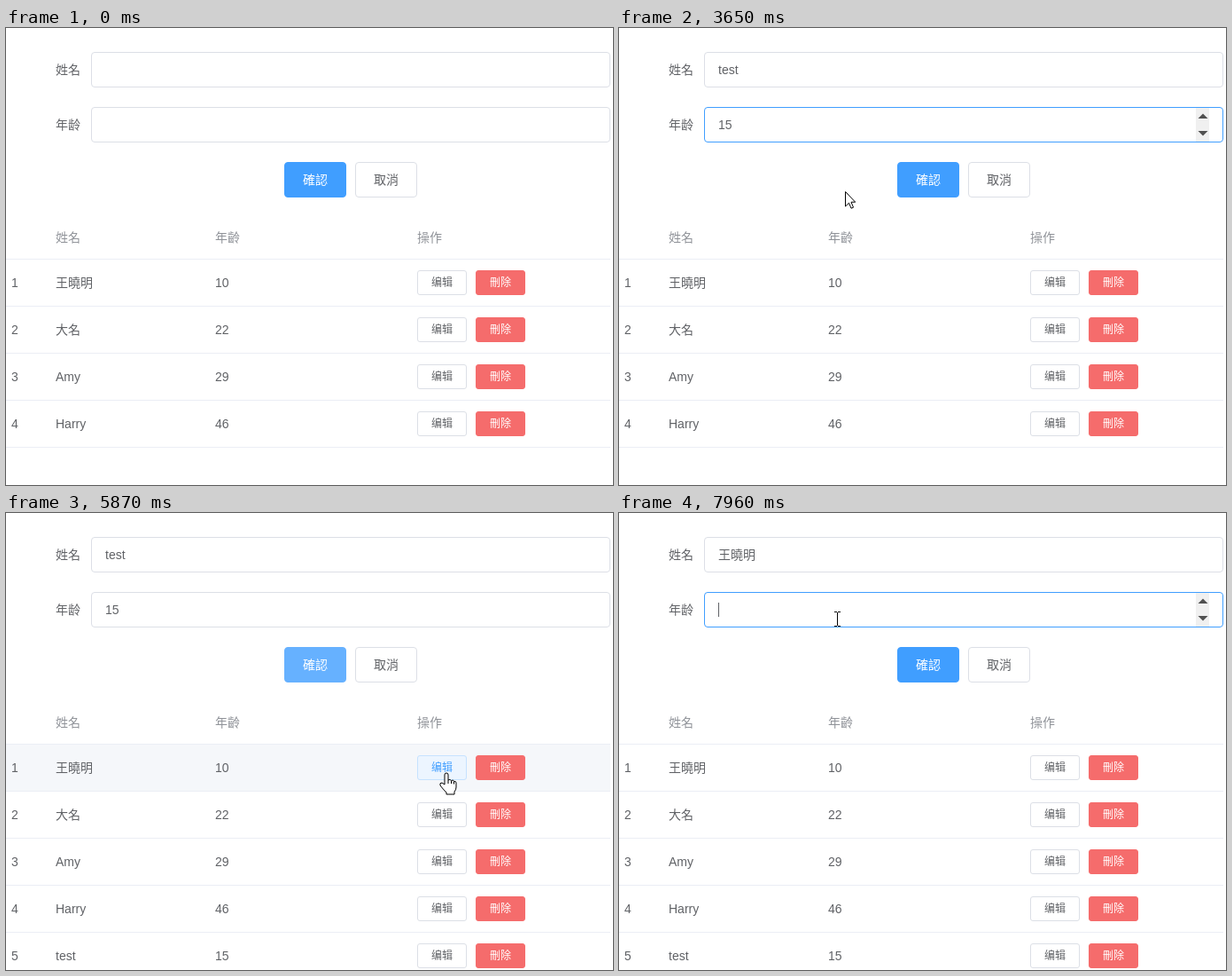
Write an HTML page with a canvas that moves like this. It is 685 by 515 pixels and loops after 8 s.

```html
<!DOCTYPE html>
<html lang="zh-Hant">
<head>
<meta charset="utf-8">
<title>Form and table</title>
<style>
html, body { margin: 0; width: 100%; height: 100%; overflow: hidden; background: #fff; }
canvas { display: block; }
</style>
</head>
<body>
<canvas id="stage" width="685" height="515"></canvas>
<script>
const ctx = document.getElementById('stage').getContext('2d');
const LOOP = 8000;
const FONT = '"Liberation Sans", "Noto Sans CJK TC", "Noto Sans CJK SC", "Noto Sans CJK JP", sans-serif';
const TEXT = '#606266', BORDER = '#dcdfe6', BLUE = '#409eff', WHITE = '#ffffff';
const people = [['王曉明', 10], ['大名', 22], ['Amy', 29], ['Harry', 46], ['test', 15]];

// Boxes are [x, y, width, height]
const nameBox = [96, 27, 586, 40], ageBox = [96, 89, 586, 40];
const confirmBox = [314, 151, 70, 40], cancelBox = [394, 151, 70, 40];
const rowTop = i => 261 + 53 * i;
const editBox = i => [464, rowTop(i) + 12, 56, 28];
const deleteBox = i => [530, rowTop(i) + 12, 56, 28];

// The pointer advances in twelve steps per move; path points are [step, x, y]
const moves = [
  { start: 130, end: 890, path: [[0, 652, 391], [7, 230, 110], [11, 176, 57]] },
  { start: 3440, end: 4200, path: [[-1, 176, 57], [1, 214, 124], [2, 233, 160], [3, 255, 184],
    [4, 265, 192], [6, 280, 198], [11, 330, 181]] },
  { start: 4800, end: 5600, path: [[-1, 330, 181], [0, 334, 195], [5, 430, 388], [7, 458, 372],
    [8, 468, 340], [11, 497, 293]] },
  { start: 6200, end: 6950, path: [[-1, 497, 293], [1, 490, 289], [3, 410, 262], [4, 351, 191],
    [9, 246, 119]] }
];

const nameField = {
  box: nameBox, focus: [[1100, 2570]],
  keys: [[0, ''], [1830, 't'], [1960, 'te'], [2180, 'tes'], [2310, 'test'], [6200, '王曉明']]
};
const ageField = {
  box: ageBox, focus: [[2570, 4270], [6900, LOOP]], spinner: true,
  keys: [[0, ''], [2910, '1'], [3040, '15'], [6200, '10'], [7760, '1'], [7900, '']]
};

const between = (t, a, b) => t >= a && t < b;
const latest = (list, t, key) => list.filter(item => key(item) <= t).pop();

function pointerAt(t) {
  const move = latest(moves, t, m => m.start);
  if (!move) return null;
  const step = Math.min(11, Math.floor((t - move.start) / (move.end - move.start) * 11));
  const next = move.path.find(p => p[0] >= step) || move.path[move.path.length - 1];
  const prev = latest(move.path, step, p => p[0]);
  const k = next[0] > prev[0] ? (step - prev[0]) / (next[0] - prev[0]) : 0;
  return [1, 2].map(i => Math.round(prev[i] + (next[i] - prev[i]) * k));
}

function hovers([x, y, w, h], t) {
  const p = pointerAt(t);
  return !!p && between(p[0], x, x + w) && between(p[1], y, y + h);
}

// Share of the last `ms` during which a state held: a linear transition
function fade(test, t, ms = 100) {
  let held = 0;
  for (let i = 0; i < 10; i++) held += test(t - ms * i / 10) ? 1 : 0;
  return held / 10;
}

function mix(from, to, k) {
  const channel = (c, i) => parseInt(c.slice(i, i + 2), 16);
  return '#' + [1, 3, 5].map(i =>
    Math.round(channel(from, i) + (channel(to, i) - channel(from, i)) * k).toString(16).padStart(2, '0')).join('');
}

function write(text, x, middle, color = TEXT, size = 14, weight = 400, align = 'left') {
  ctx.font = `${weight} ${size}px ${FONT}`;
  ctx.textAlign = align;
  ctx.fillStyle = color;
  ctx.fillText(text, x, middle + (size > 12 ? 5 : 4));
}

function panel([x, y, w, h], fill, border, radius) {
  ctx.beginPath();
  ctx.roundRect(x + .5, y + .5, w - 1, h - 1, radius - .5);
  ctx.fillStyle = fill;
  ctx.fill();
  ctx.strokeStyle = border;
  ctx.lineWidth = 1;
  ctx.stroke();
}

function button(box, label, fill, border, color, weight) {
  const [x, y, w, h] = box, small = h < 40;
  panel(box, fill, border, small ? 3 : 4);
  write(label, x + w / 2, y + h / 2, color, small ? 12 : 14, weight, 'center');
}

function plainButton(box, label, t, active = () => false) {
  const k = fade(s => hovers(box, s) || active(s), t);
  button(box, label, mix(WHITE, '#ecf5ff', k), mix(BORDER, '#c6e2ff', k), mix(TEXT, BLUE, k));
}

function triangle(x, y, rise) {
  ctx.beginPath();
  ctx.moveTo(x - 5.5, y);
  ctx.lineTo(x + 5.5, y);
  ctx.lineTo(x, y + rise);
  ctx.fill();
}

function field({ box, focus, keys, spinner }, label, t) {
  const [x, y, , h] = box, middle = y + h / 2;
  const focused = s => focus.some(([a, b]) => between(s, a, b));
  const gray = mix(BORDER, '#c0c4cc', fade(s => hovers(box, s), t, 200));
  write(label, 56, middle);
  panel(box, WHITE, mix(gray, BLUE, fade(focused, t, 200)), 4);

  const [keyTime, value] = latest(keys, t, k => k[0]);
  write(value, x + 16, middle);
  if (focused(t)) {
    const since = Math.max(keyTime, latest(focus, t, f => f[0])[0]);
    if (Math.floor((t - since) / 530) % 2 === 0)
      ctx.fillRect(Math.floor(x + 16 + ctx.measureText(value).width), middle - 8, 1, 16);
  }
  if (spinner && (focused(t) || hovers(box, t))) {
    ctx.fillStyle = '#f0f0f0';
    ctx.fillRect(651, y + 1, 15, h - 2);
    ctx.fillStyle = '#505050';
    triangle(659, y + 13, -5.5);
    triangle(659, y + 27, 5.5);
  }
}

function confirmButton(t) {
  const k = fade(s => hovers(confirmBox, s) || between(s, 4270, 6200), t);
  const fill = between(t, 4270, 4330) ? '#3a8ee6' : mix(BLUE, '#66b1ff', k);
  button(confirmBox, '確認', fill, fill, WHITE, 500);
}

function table(t) {
  write('姓名', 56, 236, '#909399', 14, 500);
  write('年齡', 236, 236, '#909399', 14, 500);
  write('操作', 464, 236, '#909399', 14, 500);
  people.slice(0, t < 4330 ? 4 : 5).forEach(([name, age], i) => {
    const top = rowTop(i), middle = top + 26;
    const lit = fade(s => s > 4400 && hovers([0, top, 682, 53], s - 70), t);
    ctx.fillStyle = mix(WHITE, '#f5f7fa', lit);
    ctx.fillRect(0, top, 682, 52);
    ctx.fillStyle = '#ebeef5';
    ctx.fillRect(0, top - 1, 682, 1);
    ctx.fillRect(0, top + 52, 682, 1);
    write(i + 1, 6, middle);
    write(name, 56, middle);
    write(age, 236, middle);
    plainButton(editBox(i), '编辑', t, s => i === 0 && between(s, 6130, 6950));
    const red = mix('#f56c6c', '#f78989', fade(s => hovers(deleteBox(i), s), t));
    button(deleteBox(i), '刪除', red, red, WHITE);
  });
}

const arrow = new Path2D('M.5 .5V17L4.5 13.2 7 19.2 9.5 18.2 7 12.2H11.7Z');
const hand = new Path2D('M-2 13V2Q-2 0 0 0T2 2V8Q4 6.5 5.5 8.5Q8 7 8.5 9.5Q11 9 11 11V16Q11 19 9 21V24' +
  'H0V22Q-4 18 -7 14Q-8 11 -5 11Q-3.5 12 -2 13ZM2 8V12M5.5 9V12M8.5 10V12.5');

function pointer(t) {
  const p = pointerAt(t);
  if (!p) return;
  const over = boxes => boxes.some(box => hovers(box, t));
  const buttons = [confirmBox, cancelBox, ...people.flatMap((_, i) => [editBox(i), deleteBox(i)])];
  ctx.save();
  ctx.translate(...p);
  ctx.fillStyle = '#000';
  if (over([nameBox, ageBox])) {
    for (const y of [-8, 8]) {
      ctx.fillRect(-3, y, 3, 1);
      ctx.fillRect(1, y, 3, 1);
    }
    ctx.fillRect(0, -7, 1, 15);
  } else {
    const shape = over(buttons) ? hand : arrow;
    ctx.fillStyle = WHITE;
    ctx.fill(shape);
    ctx.strokeStyle = '#000';
    ctx.lineWidth = 1;
    ctx.stroke(shape);
  }
  ctx.restore();
}

function draw(now) {
  const t = now % LOOP;
  ctx.fillStyle = WHITE;
  ctx.fillRect(0, 0, 685, 515);
  field(nameField, '姓名', t);
  field(ageField, '年龄', t);
  confirmButton(t);
  plainButton(cancelBox, '取消', t);
  table(t);
  pointer(t);
  requestAnimationFrame(draw);
}
requestAnimationFrame(draw);
</script>
</body>
</html>
```
